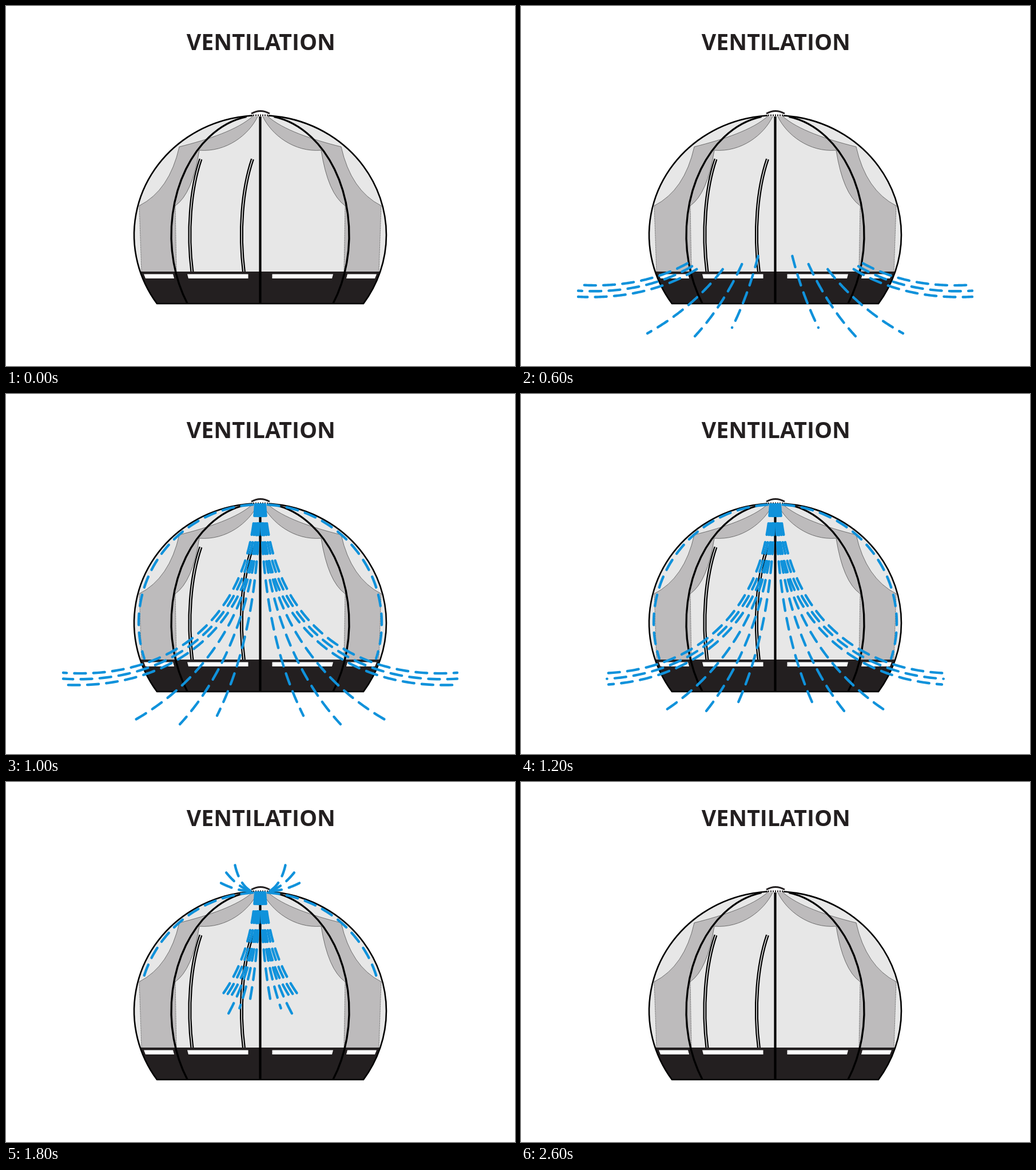
Animation of 890x629 px, one loop 2800 ms. Source, as an HTML page with a canvas:

```html
<!DOCTYPE html>
<html lang="en">
<head>
<meta charset="utf-8">
<title>Ventilation</title>
<style>
  html, body { margin: 0; width: 100%; height: 100%; overflow: hidden; background: #fff; }
  canvas { display: block; }
</style>
</head>
<body>
<canvas id="stage" width="890" height="629"></canvas>
<script>
const ctx = document.getElementById('stage').getContext('2d');
const STEP = 200, LOOP = 2800;
const MID = 444.5, EQUATOR = 400, DOME_RX = 220.5, DOME_RY = 209;
const INK = '#231f20', BLUE = '#1092db', LIGHT = '#e7e7e7', GREY = '#bdbbbc';

const clamp = v => Math.max(0, Math.min(1, v));
const mix = (a, b, t) => a + (b - a) * t;
const fan = draw => [0, 1, 2].map(draw);

// Bezier of any degree, as a function of its parameter.
function bezier(...points) {
  return t => {
    let row = points;
    while (row.length > 1) {
      row = row.slice(1).map((p, i) => [mix(row[i][0], p[0], t), mix(row[i][1], p[1], t)]);
    }
    return row[0];
  };
}

// Air paths of the left half, from the inlet to the vent; the right half is mirrored.
const sideAir = fan(k => bezier(
  [100, 487 + 10.5 * k], [280 + 12 * k, 500 + 9 * k],
  [424 + 10 * k, 400 - 4 * k], [436 + 1.8 * k, 193]));
const frontAir = [
  bezier([221, 572], [350, 500], [440, 370], [441, 193]),
  bezier([304, 577], [385, 490], [440, 350], [442.5, 193]),
  bezier([369, 562], [417, 465], [440, 350], [444, 193])
];
const domeAir = [t => {
  const angle = mix(-0.305, 1.508, t);
  return [MID - 212.5 * Math.cos(angle), EQUATOR - 207 * Math.sin(angle)];
}];
const exhaustAir = fan(k => {
  const angle = (15 + 22.5 * k) * Math.PI / 180;
  return bezier([427, 190], [404 + 1.5 * k, 191 - 7 * k],
    [427 - 54 * Math.cos(angle), 190 - 54 * Math.sin(angle)]);
});

function mirrored(draw) {
  draw();
  ctx.save();
  ctx.translate(2 * MID, 0);
  ctx.scale(-1, 1);
  draw();
  ctx.restore();
}

function stroke(path, width, color = '#000', dash = []) {
  ctx.lineWidth = width;
  ctx.strokeStyle = color;
  ctx.setLineDash(dash);
  ctx.stroke(path);
}

function fill(path, color) {
  ctx.fillStyle = color;
  ctx.fill(path);
}

// Dashes are laid out beginning at parameter `from`.
function drawAir(streams, from, to) {
  if (from === to) return;
  for (const point of streams) {
    const path = new Path2D();
    for (let i = 0; i <= 80; i++) path.lineTo(...point(mix(from, to, i / 80)));
    stroke(path, 4.4, BLUE, [20, 13.3]);
  }
}

function drawFlow(step) {
  const rise = step < 5 ? 0.132 * step : 1;
  const n = Math.max(0, step - 5);
  const drain = step > 10 ? 1 : 0.0633 * n + 0.0217 * n * n;
  drawAir(sideAir, rise, clamp(drain * 1.05 + (step > 10)));
  drawAir(frontAir, rise, clamp(drain * 0.9 + (step > 10)));

  const domeHead = step < 5 ? clamp(0.15 * (step - 3)) : 1;
  drawAir(domeAir, domeHead, clamp((step - 8) / 3));

  if (step >= 7 && step <= 12) drawAir(exhaustAir, step === 12 ? 0.6 : 0, 1);
}

function dome(rx, fromY, toY) {
  const angle = y => Math.PI - Math.asin((y - EQUATOR) / DOME_RY);
  const path = new Path2D();
  path.ellipse(MID, EQUATOR, rx, DOME_RY, 0, angle(fromY), angle(toY));
  return path;
}

const shell = new Path2D();
const baseAngle = Math.asin(120 / DOME_RY);
shell.ellipse(MID, EQUATOR, DOME_RX, DOME_RY, 0, Math.PI - baseAngle, 2 * Math.PI + baseAngle);
shell.closePath();
const rib = dome(155.5, 520, 193.5);

const lowerDrape = 'Q286 322 233 349';
const upperDrape = 'Q326 328 338 252 C385 256 425 225 440 193';
const topEdge = 'C405 216 355 233 303 246';
const panel = new Path2D(`M303 246 ${lowerDrape} L237 465 H298 L296 349 ${upperDrape} H431 ${topEdge}Z`);
const panelEdges = new Path2D(`M303 246 ${lowerDrape} M296 349 ${upperDrape} M431 193 ${topEdge}`);
const panelSeams = new Path2D('M233 349 L237 465 M296 349 L298 465');
const windows = new Path2D('M241 468.5 H292 L294 476 H244Z M317 468.5 H423.5 V476 H319Z');
const zipper = new Path2D('M340.5 267.5 C322.5 320 316.5 395 325.5 465');
const pole = new Path2D(`M${MID} 193 V520`);
const vent = new Path2D('M430 188 Q445 180 460 188 L458 193 H432Z');
const ventHoles = new Path2D('M432 191 H458');
const cap = new Path2D('M429 188 Q445 179 461 188');

function drawTent() {
  fill(shell, LIGHT);
  mirrored(() => {
    fill(panel, GREY);
    stroke(panelEdges, 0.7, '#444');
    stroke(panelSeams, 0.7, '#444', [2, 1]);
  });

  ctx.save();
  for (let i = 0; i < 2; i++) {
    stroke(zipper, 6);
    stroke(zipper, 1.6, LIGHT);
    ctx.translate(90.5, 0);
  }
  ctx.restore();

  ctx.save();
  ctx.clip(shell);
  ctx.fillStyle = INK;
  ctx.fillRect(200, 464, 490, 57);
  ctx.restore();
  mirrored(() => fill(windows, '#fff'));

  stroke(shell, 2.6);
  mirrored(() => stroke(rib, 3.3));
  stroke(pole, 4.2);

  fill(vent, '#fff');
  stroke(ventHoles, 3, INK, [2, 2]);
  stroke(cap, 3, INK);
}

function drawTitle() {
  ctx.fillStyle = INK;
  ctx.font = 'bold 39.2px "Open Sans", sans-serif';
  ctx.textAlign = 'center';
  ctx.fillText('VENTILATION', 445.9, 76.5);
}

function render() {
  const step = Math.floor(performance.now() % LOOP / STEP);
  ctx.fillStyle = '#fff';
  ctx.fillRect(0, 0, 890, 629);
  ctx.lineCap = 'butt';
  ctx.lineJoin = 'round';
  drawTitle();
  drawTent();
  ctx.lineCap = 'round';
  mirrored(() => drawFlow(step));
  requestAnimationFrame(render);
}
render();
</script>
</body>
</html>
```
